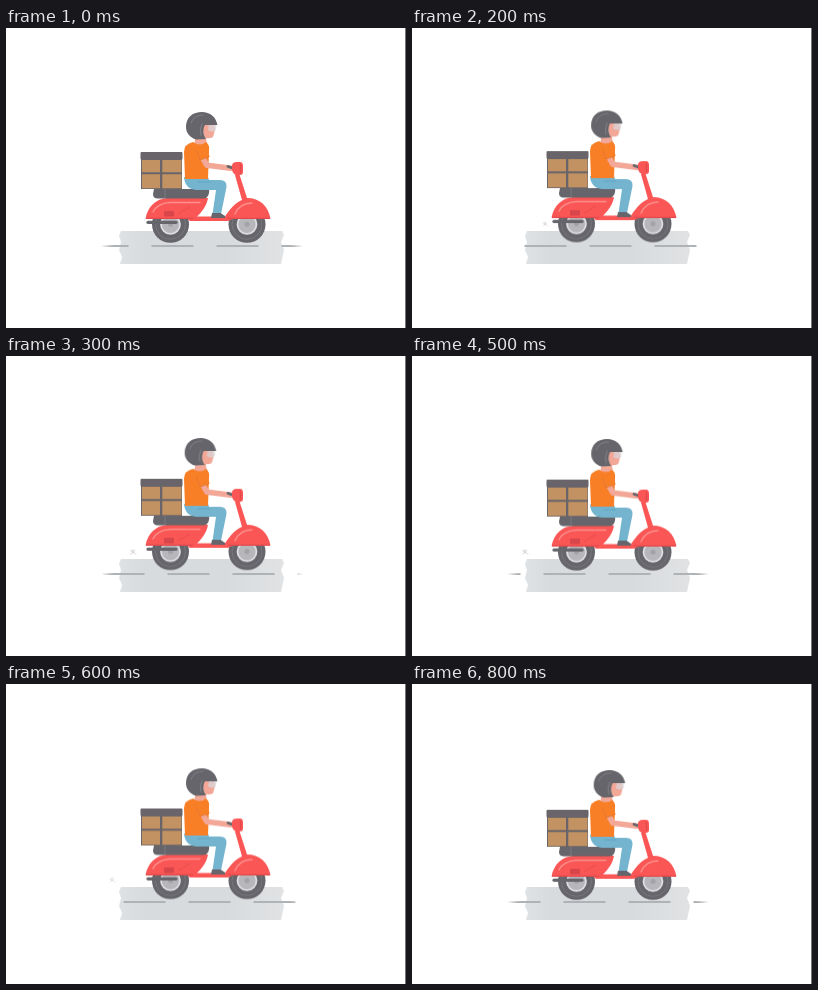
An HTML page without scripts that plays this animation: 400x300 px, repeating every 0.9 s.

```html
<!DOCTYPE html>
<html lang="en">
<head>
<meta charset="utf-8">
<title>Scooter delivery</title>
<style>
  html, body { margin: 0; width: 100%; height: 100%; overflow: hidden; background: #fff; }
  svg { display: block; width: 100%; height: 100%; }
  .bob, .head, .dashes, .puff { animation: .9s step-end infinite; }
  .bob { --amp: 1px; animation-name: bob; }
  .wheels { --amp: .6px; }
  .head { animation-name: nod; }
  .dashes { animation-name: drive; }
  .puff { animation-name: puff; }

  .red { fill: #fa5655; }
  .dark { fill: #66656b; }
  .skin { fill: #f2a797; }
  .line { fill: none; stroke-linecap: round; stroke-linejoin: round; }

  @keyframes bob {
    0% { transform: none; }
    11.1% { transform: translateY(calc(-.5 * var(--amp))); }
    22.2% { transform: translateY(calc(-.9 * var(--amp))); }
    33.3% { transform: translateY(calc(-1.2 * var(--amp))); }
    44.4% { transform: translateY(calc(-1.2 * var(--amp))); }
    55.5% { transform: translateY(calc(-.4 * var(--amp))); }
    66.6% { transform: translateY(calc(.5 * var(--amp))); }
    77.7% { transform: translateY(calc(1.3 * var(--amp))); }
    88.8% { transform: translateY(calc(1.8 * var(--amp))); }
  }
  @keyframes nod {
    0% { transform: none; }
    11.1% { transform: translate(-.4px, -.3px); }
    22.2% { transform: translate(-.9px, -.6px); }
    33.3% { transform: translate(-1.3px, -.8px); }
    44.4% { transform: translate(-1.5px, -.8px); }
    55.5% { transform: translate(-.8px, -.6px); }
    66.6% { transform: translate(0, -.2px); }
    77.7% { transform: translate(.8px, 0); }
    88.8% { transform: translate(1.7px, .3px); }
  }
  @keyframes drive {
    0% { transform: none; }
    11.1% { transform: translateX(-16px); }
    22.2% { transform: translateX(-33px); }
    33.3% { transform: translateX(-49px); }
    44.4% { transform: translateX(-65px); }
    55.5% { transform: translateX(-79px); }
    66.6% { transform: translateX(-93px); }
    77.7% { transform: translateX(-108px); }
    88.8% { transform: translateX(-124px); }
  }
  @keyframes puff {
    0% { opacity: 0; }
    11.1% { opacity: .4; transform: translate(139px, 195px) scale(.5); }
    22.2% { opacity: .8; transform: translate(133px, 196px) scale(.8); }
    33.3% { opacity: .8; transform: translate(127px, 196px); }
    44.4% { opacity: .8; transform: translate(120.5px, 196px); }
    55.5% { opacity: .8; transform: translate(113px, 196px); }
    66.6% { opacity: .6; transform: translate(106px, 196px) scale(.9); }
    77.7%, 100% { opacity: 0; }
  }
</style>
</head>
<body>
<svg viewBox="0 0 400 300">
  <defs>
    <linearGradient id="asphalt">
      <stop offset="0" stop-color="#dfe2e4"/>
      <stop offset=".15" stop-color="#d7dbdd"/>
      <stop offset=".65" stop-color="#d8dbdd"/>
      <stop offset="1" stop-color="#e0e2e4"/>
    </linearGradient>
    <clipPath id="lane"><path d="M95 218L115 216.5H277L297 218L277 220H115Z"/></clipPath>
    <g id="wheel">
      <circle r="18.5" class="dark"/>
      <circle r="15" fill="none" stroke="#77777d"/>
      <circle r="9.5" fill="#b6b6bb" stroke="#dfdfe3" stroke-width="1.8"/>
      <circle r="2.5" fill="#a2a2a8"/>
    </g>
  </defs>

  <path d="M399.5 0V300" stroke="#77787a"/>

  <path d="M115 203H276L278 207L275 214L278 222L275 236H114L116 229L113 222L115 214L113 208Z" fill="url(#asphalt)"/>
  <g clip-path="url(#lane)">
    <path class="dashes" d="M80.5 218H500" stroke="#b0b3b5" stroke-width="2.1" stroke-dasharray="42 23"/>
  </g>

  <g class="puff">
    <path class="line" d="M-2.500 -1.5L2 1.500M-2 2L2 -1.5M0 -2.5V-1M2.800 2H3" stroke="#c9c3c3"/>
  </g>

  <g class="bob wheels">
    <use href="#wheel" x="164.5" y="196.3"/>
    <use href="#wheel" x="241" y="196.3"/>
  </g>

  <g class="bob">
    <!-- scooter -->
    <path class="line" d="M142 194.3H170" stroke="#66656b" stroke-width="3.2"/>
    <path class="red" d="M139.5 190.5C142 178 150 171 161 170H202C201 177 196 184 191 188.5H219C224 181 229 175 236 172L229 147L233 145L241 170C254 170 262 178 264.5 190.5H228L222 193H184L181 190.5Z"/>
    <path class="line" d="M147 184C150 178 156 175 164 174.5H194M229 186C232 179 238 175 246 175" stroke="#fc8f8b" stroke-width="1.4"/>
    <path d="M140 190.3H187M222 190.3H264" stroke="#e2484c" stroke-width="1.2"/>
    <rect x="158" y="183" width="10" height="5.5" rx="1" fill="#d8454a"/>
    <path d="M172 186L184 179" stroke="#e84d50"/>
    <path class="dark" d="M148 161H201Q204 161 203 165Q202 170.500 197 170.500H151Q147 170 147 166Z"/>
    <path d="M159 161V170" stroke="#7b7b80"/>

    <!-- parcels -->
    <rect x="135" y="130" width="41" height="31" fill="#68646a"/>
    <path d="M136 132H154V144.300H136ZM156.300 132H175.500V144.300H156.300ZM136 146.300H154V160.300H136ZM156.300 146.300H175.500V160.300H156.300Z" fill="#c29262"/>
    <rect x="134.5" y="124" width="42" height="7.500" rx="1" fill="#68646a"/>

    <!-- rider -->
    <path d="M178 149H202L203 152H214Q221 152 220.500 159L215 186H206.500L210 162H190Q179 161 178 149Z" fill="#74b4cf"/>
    <path class="line" d="M192 154H204" stroke="#60a4c1"/>
    <path class="dark" d="M206 185H214.500L219 188V190H205Z"/>
    <path class="skin" d="M190 107H199.500L201 117H188Z"/>
    <path d="M187 114Q194 119 200 114Q204 117 203 123L202 151H179L178 124Q178 116 187 114Z" fill="#f87f26"/>
    <path class="line" d="M195 127L201 137.300L225 140.300" stroke="#f2a797" stroke-width="5.600"/>
    <path d="M190.500 121L194 132L203.500 128.500L201 118Z" fill="#f87f26"/>
    <path class="line" d="M190.800 123L194 132L203 128.700" stroke="#e37530" stroke-width=".8"/>
    <path class="line" d="M222 138.500L228 140.500" stroke="#66656b" stroke-width="2.800"/>
    <path class="red" d="M226 138Q226 134 231 134H234Q237 134 237 138V144Q237 147 234 147H230Q227 146 226 142Z"/>
    <path d="M234.500 136V145" stroke="#e2484c" stroke-width="1.300"/>

    <g class="head">
      <path class="skin" d="M196 95H208L209 102L207 109Q204 111 198 110Z"/>
      <path d="M203 96H210.500L210 102Q206 105 202 102Z" fill="#d8d6da" opacity=".75"/>
      <path class="dark" d="M180 99C180 89 187 84 196 84C204 84 210 89 211.500 97L199 97C196.500 101 197 107 200 111L190 111.500C184 109.500 180 105 180 99Z"/>
      <path class="line" d="M185 95C187 89 192 87 197 87M196 96Q193 102 195 108" stroke="#828187"/>
    </g>
  </g>
</svg>
</body>
</html>
```
